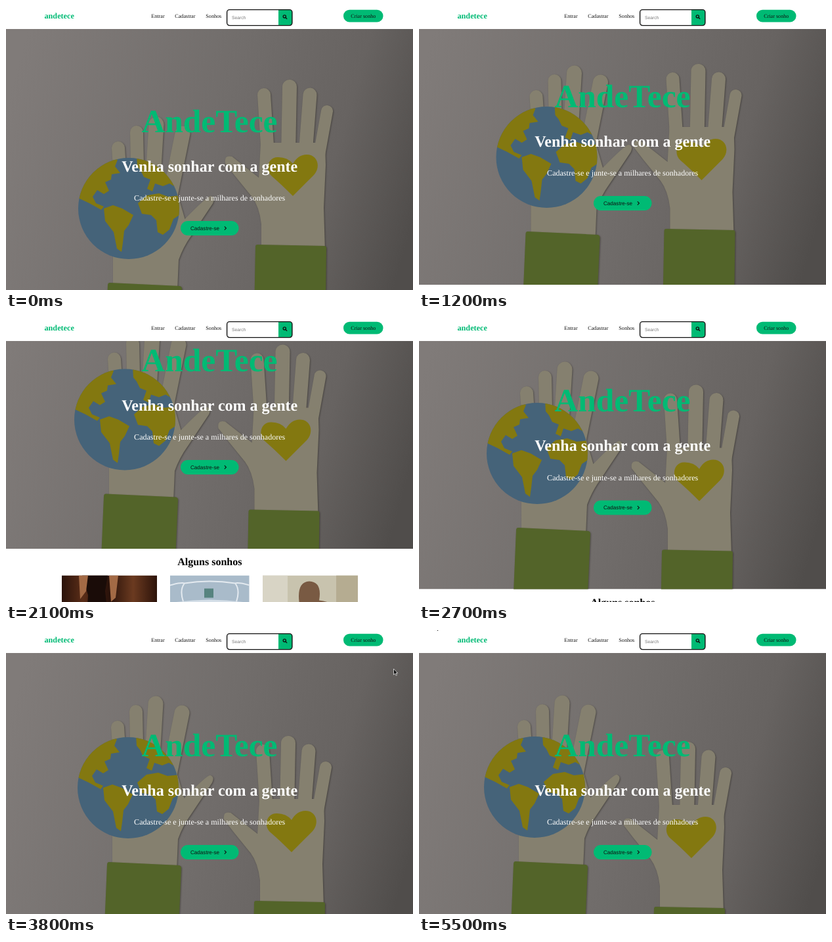
Write an HTML page that moves like this. It is 620 px wide and 432 px high and loops after 5.6 s.

```html
<!DOCTYPE html>
<html lang="pt">
<head>
<meta charset="utf-8">
<title>AndeTece</title>
<style>
  html, body { margin: 0; width: 100%; height: 100%; overflow: hidden; background: #fff; }
  svg { display: block; }
  text { font-family: "Liberation Serif", "Times New Roman", serif; text-rendering: geometricPrecision; }
  .sans { font-family: "Liberation Sans", Arial, sans-serif; }
  .bold { font-weight: bold; }
  .mid { text-anchor: middle; }
  .nav { font-size: 8.15px; fill: #111; }
  .green { fill: #00ba74; }
  .white { fill: #fff; }
  .land { fill: #837810; }
  .cuff { fill: #536429; }
  .shade { filter: drop-shadow(1px 1px .8px rgba(40, 36, 30, .5)); }
  .skin { fill: #85806f; stroke: #85806f; stroke-linecap: round; stroke-linejoin: round; }
  .skin line { fill: none; }
  .skin path { stroke-width: 2; }
</style>
</head>
<body>
<svg width="620" height="432" viewBox="0 0 620 432">
  <defs>
    <linearGradient id="wall" gradientUnits="userSpaceOnUse" x1="0" y1="150" x2="620" y2="330">
      <stop offset="0" stop-color="#807b79"/>
      <stop offset=".5" stop-color="#716d6b"/>
      <stop offset=".78" stop-color="#676361"/>
      <stop offset="1" stop-color="#504d4b"/>
    </linearGradient>
    <linearGradient id="wood">
      <stop offset="0" stop-color="#2b130b"/>
      <stop offset=".22" stop-color="#5a2d18"/>
      <stop offset=".5" stop-color="#2a120a"/>
      <stop offset=".75" stop-color="#6b3a20"/>
      <stop offset="1" stop-color="#2c130a"/>
    </linearGradient>
    <clipPath id="disc"><circle r="77"/></clipPath>
  </defs>

  <g id="page">
    <svg width="620" height="462" overflow="hidden">
      <rect width="620" height="462" fill="url(#wall)"/>

      <g id="left">
        <g class="skin shade">
          <line x1="-16" y1="-92" x2="-10" y2="0" stroke-width="20"/>
          <line x1="12" y1="-116" x2="14" y2="-20" stroke-width="20"/>
          <line x1="42" y1="-128" x2="36" y2="-30" stroke-width="23"/>
          <line x1="82" y1="-114" x2="62" y2="-15" stroke-width="23"/>
          <path d="M-23 0L-23 125L73 125L75 78Q82 58 95 40L127 -8Q131 -16 125 -18Q120 -18 85 18L74 -20Z"/>
        </g>
        <path class="cuff shade" d="M-29 113L78 118Q81 119 81 122L75 260H-38L-32 117Q-32 113 -29 113Z"/>
        <circle r="77" fill="#456379"/>
        <g class="land" clip-path="url(#disc)">
          <path d="M-77 -16L-80 -60L-30 -80L-17 -74L-21 -64L-13 -54L-26 -52L-27 -44L-36 -40L-30 -27L-38 -22L-48 -28L-55 -18L-50 -8L-38 -3L-42 2L-60 -8Z"/>
          <path d="M-38 0L-24 -5L-10 0L7 10L0 25L-7 34L-9 52L-11 66L-18 61L-23 36L-36 19Z"/>
          <path d="M12 -80L80 -60L80 -28L62 -38L52 -34L40 -38L36 -26L28 -30L33 -44L23 -48L18 -58L13 -64Z"/>
          <path d="M14 -8L28 -20L46 -23L60 -18L80 -20L80 8L68 16L62 32L52 40L44 36L42 18L34 10L20 8Z"/>
        </g>
      </g>

      <g id="right">
        <g class="skin shade">
          <line x1="-44" y1="-122" x2="-38" y2="-30" stroke-width="20"/>
          <line x1="-5" y1="-134" x2="-7" y2="-30" stroke-width="22"/>
          <line x1="26" y1="-122" x2="19" y2="-30" stroke-width="21"/>
          <line x1="52" y1="-97" x2="39" y2="-25" stroke-width="18"/>
          <path d="M-48 -48L48 -48L49 -15L46 50L48 115H-47L-47 75Q-50 48 -62 32L-88 0L-102 -18Q-104 -30 -93 -27L-51 6Z"/>
        </g>
        <path class="cuff shade" d="M-54 106L48 108Q51 108 51 111L49 270H-60L-57 109Q-57 106 -54 106Z"/>
        <path class="land" d="M0 32Q-18 14 -32 2C-44 -9 -37 -28 -22 -27Q-8 -27 0 -17Q8 -31 21 -31C38 -31 43 -12 32 0Q18 14 0 32Z"/>
      </g>
    </svg>

    <text class="bold green mid" x="310" y="191.5" font-size="49.5">AndeTece</text>
    <text class="bold white mid" x="310.2" y="251.5" font-size="24">Venha sonhar com a gente</text>
    <text class="white mid" x="310.2" y="296" font-size="12.05">Cadastre-se e junte-se a milhares de sonhadores</text>
    <rect class="green" x="266" y="327" width="88.500" height="22" rx="11"/>
    <text class="sans" x="281" y="340.500" font-size="8.1" fill="#111">Cadastre-se</text>
    <path d="M332.800 335.400L335.400 338L332.800 340.600" fill="none" stroke="#111" stroke-width="1.1"/>

    <text class="bold mid" x="310.300" y="487" font-size="16">Alguns sonhos</text>
    <svg x="85" y="502.500" width="145" height="95">
      <rect width="145" height="95" fill="url(#wood)"/>
      <path d="M31 0H70L66 24L74 95H36L40 30Z" fill="#1a0c08"/>
      <path d="M26 0H40L37 24L28 36ZM72 0H86L82 34L75 40Z" fill="#a36a45"/>
    </svg>
    <svg x="250" y="502.500" width="120.500" height="95">
      <rect width="121" height="95" fill="#a9bbca"/>
      <path d="M-10 18Q15 10 22 12Q60 6 99 12Q106 10 131 18M22 12Q14 22 20 40M99 12Q107 22 101 40" fill="none" stroke="#e4eaf0" stroke-width="2"/>
      <path d="M0 42Q60 32 121 42V95H0Z" fill="#d5dfe8"/>
      <rect x="52" y="20" width="14" height="14" fill="#56837f"/>
    </svg>
    <svg x="391" y="502.500" width="145" height="95">
      <rect width="145" height="95" fill="#c8c3ae"/>
      <rect width="38" height="95" fill="#d8d4c5"/>
      <rect x="112" width="33" height="95" fill="#b5ac91"/>
      <path d="M56 44Q51 10 71 9Q91 10 86 38Q110 40 122 60V95H24V60Q32 42 56 44Z" fill="#795a43"/>
    </svg>
  </g>

  <rect width="620" height="35" fill="#fff"/>
  <text class="bold green" x="58.500" y="19" font-size="12.2">andetece</text>
  <g class="nav">
    <text x="221.300" y="17.500">Entrar</text>
    <text x="257.300" y="17.500">Cadastrar</text>
    <text x="304.300" y="17.500">Sonhos</text>
  </g>
  <path class="green" d="M415 6H432Q436 6 436 10V25Q436 29 432 29H415Z"/>
  <rect x="336.600" y="5.600" width="99.300" height="24" rx="4" fill="none" stroke="#111" stroke-width="1.4"/>
  <text class="sans" x="344" y="20" font-size="6.7" fill="#777">Search</text>
  <g fill="none" stroke="#111" stroke-width="1.300">
    <circle cx="424.300" cy="15.900" r="2.100"/>
    <path d="M425.900 17.500L428.100 19.700"/>
  </g>
  <rect class="green" x="514" y="5.800" width="60.500" height="18.700" rx="9.300"/>
  <text class="nav mid" x="544.300" y="17.500">Criar sonho</text>

  <path id="pointer" d="M0 0V9L2.100 7.200L3.500 10.200L5 9.500L3.600 6.600H6.200Z" fill="#111" stroke="#fff" stroke-width=".7"/>
</svg>

<script>
  const LOOP = 5600, STEP = 100;

  // Each row: time in ms, then the values at that time.
  const scroll = [[0, 0], [1000, 0], [1200, 38], [1650, 122], [1850, 122], [2100, 111], [2700, 49.5], [3200, 0]];
  const leftHand = [
    [0, 187, 308], [1200, 194.5, 268], [2100, 181, 265.5], [2700, 180, 255.5],
    [3800, 186, 240], [4500, 180.5, 285], [5500, 176, 239]
  ];
  const rightHand = [
    [0, 437, 257], [1200, 430.5, 271], [2100, 426.5, 296.5], [2700, 427, 296],
    [3800, 435, 306], [4500, 431, 262], [5500, 415, 315]
  ];
  const pointer = [[0, 640, 90], [3500, 640, 90], [3800, 590.5, 59], [4200, 340, 40], [4500, 174.5, 5], [5000, 24.5, -8.5]];

  function sample(track, t) {
    const next = track.findIndex(row => row[0] > t);
    if (next < 0) return track[track.length - 1].slice(1);
    const a = track[next - 1], b = track[next];
    const k = (t - a[0]) / (b[0] - a[0]);
    return a.slice(1).map((v, i) => v + (b[i + 1] - v) * k);
  }

  function place(id, x, y) {
    document.getElementById(id).setAttribute("transform", `translate(${x} ${y})`);
  }

  const start = performance.now();

  function draw() {
    const elapsed = performance.now() - start;
    const t = Math.floor(elapsed / STEP) * STEP % LOOP;
    place("page", 0, -sample(scroll, t)[0]);
    place("left", ...sample(leftHand, t));
    place("right", ...sample(rightHand, t));
    place("pointer", ...sample(pointer, t));
    requestAnimationFrame(draw);
  }
  draw();
</script>
</body>
</html>
```
